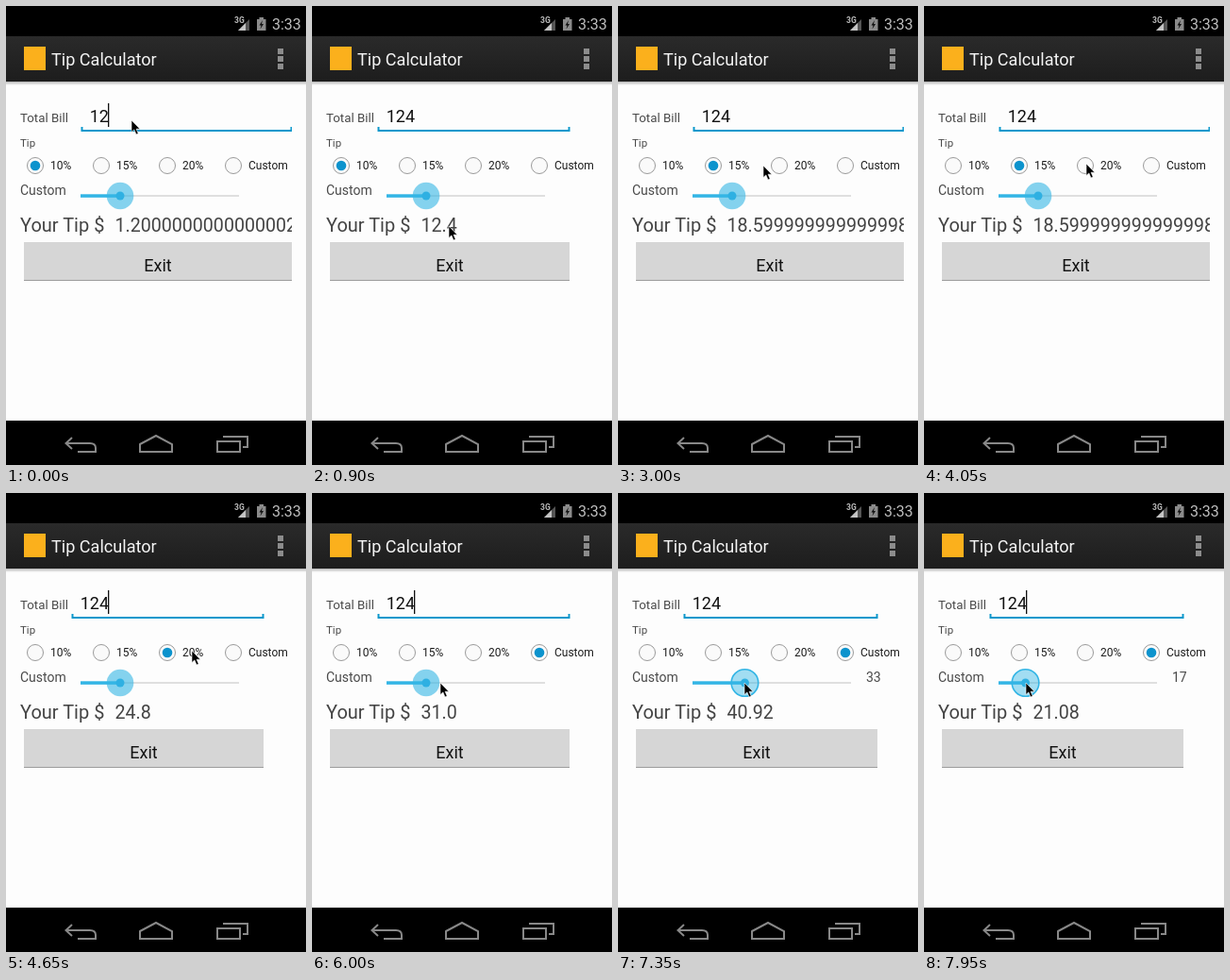
Write an HTML page that moves like this. It is 318x486 px and loops after 8 s.

```html
<!DOCTYPE html>
<html lang="en">
<head>
<meta charset="utf-8">
<title>Tip Calculator</title>
<style>
  html, body { margin: 0; width: 100%; height: 100%; overflow: hidden; background: #fdfdfd; }
  svg { display: block; width: 318px; height: 486px; font-family: Roboto, sans-serif; }
  .label { fill: #4a4a4a; font-size: 14px; }
  .option { fill: #1c1c1c; font-size: 12px; }
  .result { fill: #444; font-size: 20px; }
  .input { fill: #111; font-size: 18px; }
  .nav { fill: none; stroke: #888; stroke-width: 2; }
  #total { font-size: 13.3px; }
  #heading { font-size: 11.5px; }
  #tip { font-size: 19.6px; }
</style>
</head>
<body>
<svg viewBox="0 0 318 486">
  <defs>
    <linearGradient id="bar" x2="0" y2="1">
      <stop stop-color="#2a2a2a"/><stop offset="1" stop-color="#1d1d1d"/>
    </linearGradient>
    <linearGradient id="shade" x2="0" y2="1">
      <stop stop-color="#b5b5b5"/><stop offset="1" stop-color="#fdfdfd"/>
    </linearGradient>
    <clipPath id="content"><rect x="15" y="83" width="288" height="350"/></clipPath>
  </defs>

  <rect width="318" height="486" fill="#fdfdfd"/>
  <rect width="318" height="32"/>
  <text x="242" y="18" font-size="8.5" font-weight="700" fill="#bbb">3G</text>
  <path d="M246 26L258 14V26Z" fill="#555"/>
  <path d="M246 26L254 18V26Z" fill="#c4c4c4"/>
  <path d="M266 14H268.5V12H273V14H275.5V26H266Z" fill="#8b8b8b"/>
  <path d="M272 15L268.500 20.500H270.500L269.500 24.500L273 19H271Z" fill="#111"/>
  <text x="282" y="25" font-size="16" fill="#bdbdbd">3:33</text>

  <rect y="32" width="318" height="48" fill="url(#bar)"/>
  <rect y="80" width="318" height="4" fill="url(#shade)"/>
  <rect x="19" y="43" width="23" height="25" fill="#fbb01c"/>
  <text x="48" y="63" font-size="18.1" fill="#f4f4f4">Tip Calculator</text>
  <path d="M288 45h6v6h-6zM288 53h6v6h-6zM288 61h6v6h-6z" fill="#8c8c8c"/>

  <text id="total" class="label" x="15" y="123">Total Bill</text>
  <text id="heading" class="label" x="15" y="149">Tip</text>
  <text class="label" x="15" y="200">Custom</text>
  <g id="radios"></g>

  <g clip-path="url(#content)">
    <path id="underline" fill="none" stroke="#0a98cc" stroke-width="2"/>
    <text id="bill" class="input" y="123"></text>
    <rect id="caret" y="103" width="1.3" height="25" fill="#111"/>
    <text class="result" x="15" y="239">Your Tip $</text>
    <text id="tip" class="result" x="115.6" y="239"></text>
    <rect id="button" x="19" y="250" height="40" fill="#d6d6d6"/>
    <rect id="edge" x="19" y="290" height="1" fill="#9c9c9c"/>
    <text id="exit" class="input" y="281" text-anchor="middle">Exit</text>
  </g>

  <rect x="79" y="200" width="168" height="2" fill="#dfdfdf"/>
  <rect id="fill" x="79" y="199.3" height="3.5" fill="#33b5e5"/>
  <g id="thumb">
    <circle id="halo" r="14.3" fill="#33b5e5"/>
    <circle r="4.5" fill="#2fb0e2"/>
  </g>
  <text id="percent" class="label" x="263" y="200"></text>

  <rect y="439" width="318" height="47"/>
  <path class="nav" d="M70 457L63.500 463L70 469M64 463H89Q95 463 95 468V472H76"/>
  <path class="nav" d="M142 464L159 455L176 464V472H142Z"/>
  <path class="nav" d="M224 461H248V472H224ZM230 456H256V467H251"/>

  <path id="pointer" d="M0 0V12.500L2.900 9.900L5 15L7.200 14L5.100 9.200H9Z" stroke="#fff" stroke-width=".6"/>
</svg>
<script>
  const LOOP = 8000, STEP = 150;
  const TYPED = 300, DRAG = 6600;
  const CLICKS = [2250, 4500, 5550];
  const OPTIONS = ["10%", "15%", "20%", "Custom"];

  const $ = id => document.getElementById(id);
  const set = (id, attrs) => {
    for (const name in attrs) $(id).setAttribute(name, attrs[name]);
  };
  const radioX = i => 31 + 70 * i;
  const thumbX = percent => 79 + 1.68 * percent;

  $("radios").innerHTML = OPTIONS.map((name, i) => `
    <circle cx="${radioX(i)}" cy="169" r="8.5" fill="#fafafa" stroke="#9a9a9a"/>
    <circle class="dot" cx="${radioX(i)}" cy="169" r="5.3" fill="#0c93cd"/>
    <text class="option" x="${radioX(i) + 16}" y="173">${name}</text>`).join("");
  const dots = document.querySelectorAll(".dot");

  const home = { x: 133, y: 121 };
  const moves = [
    { from: 300, to: 900, x: 145, y: 233 },
    { from: 900, to: 1200, x: 187, y: 234 },
    { from: 1200, to: 1950, x: radioX(1) - 4, y: 168 },
    { from: 2250, to: 2700, x: 154, y: 169 },
    { from: 3000, to: 3150, x: radioX(2) + 1, y: 167 },
    { from: 4350, to: 5250, x: radioX(3) + 5, y: 168 },
    { from: 5550, to: 6000, x: thumbX(25) + 15, y: 201 },
    { from: 6000, to: 6450, x: thumbX(25), y: 201 }
  ];

  function pointerAt(t) {
    return moves.reduce((p, m) => {
      const k = Math.min(1, Math.max(0, (t - m.from) / (m.to - m.from)));
      return { x: p.x + (m.x - p.x) * k, y: p.y + (m.y - p.y) * k };
    }, home);
  }

  // The drag rises from 25 to about 33 and falls back to 17.
  function percentAt(t) {
    const s = Math.max(0, (t - DRAG) / 1350);
    return Math.round(25 + 42.4 * s - 50.4 * s * s);
  }

  function tipText(bill, option, percent) {
    const tip = option === 3 ? bill * percent / 100 : bill * parseInt(OPTIONS[option]) / 100;
    // Preset rates are binary fractions, so their rounding error shows.
    const shown = option === 3 ? tip : bill * [0.1, 0.15, 0.2][option];
    return Number.isInteger(shown) ? shown.toFixed(1) : String(shown);
  }

  function render(t) {
    const bill = t < TYPED ? 12 : 124;
    const option = CLICKS.filter(time => t >= time).length;
    const percent = percentAt(t);
    const dragging = t >= DRAG;
    const tip = tipText(bill, option, percent);

    const wide = tip.length > 6;
    const left = wide ? 80 : 70;
    const right = wide ? 303 : tip.length > 4 ? 275 : 273;
    const caretOn = t < 900 || (t - 900) % 1050 >= 450;

    $("bill").textContent = bill;
    $("tip").textContent = tip;
    $("percent").textContent = t > DRAG ? percent : "";
    set("bill", { x: left + 8.7 });
    set("caret", {
      x: left + 8 + 10 * String(bill).length,
      opacity: caretOn ? 1 : 0
    });
    set("underline", { d: `M${left + .5} 128V132H${right - .5}V128` });
    set("button", { width: right - 19 });
    set("edge", { width: right - 19 });
    set("exit", { x: (19 + right) / 2 });
    dots.forEach((dot, i) => dot.setAttribute("opacity", i === option ? 1 : 0));

    const x = thumbX(percent);
    set("fill", { width: x - 79 });
    set("thumb", { transform: `translate(${x} 201)` });
    set("halo", {
      "fill-opacity": dragging ? .45 : .6,
      stroke: dragging ? "#33b5e5" : "none",
      "stroke-width": 1.6
    });

    const pointer = dragging ? { x, y: 201 } : pointerAt(t);
    set("pointer", { transform: `translate(${Math.round(pointer.x)} ${Math.round(pointer.y)})` });
  }

  const start = performance.now();
  function tick() {
    const t = (performance.now() - start) % LOOP;
    render(Math.floor(t / STEP) * STEP);
    requestAnimationFrame(tick);
  }
  tick();
</script>
</body>
</html>
```
